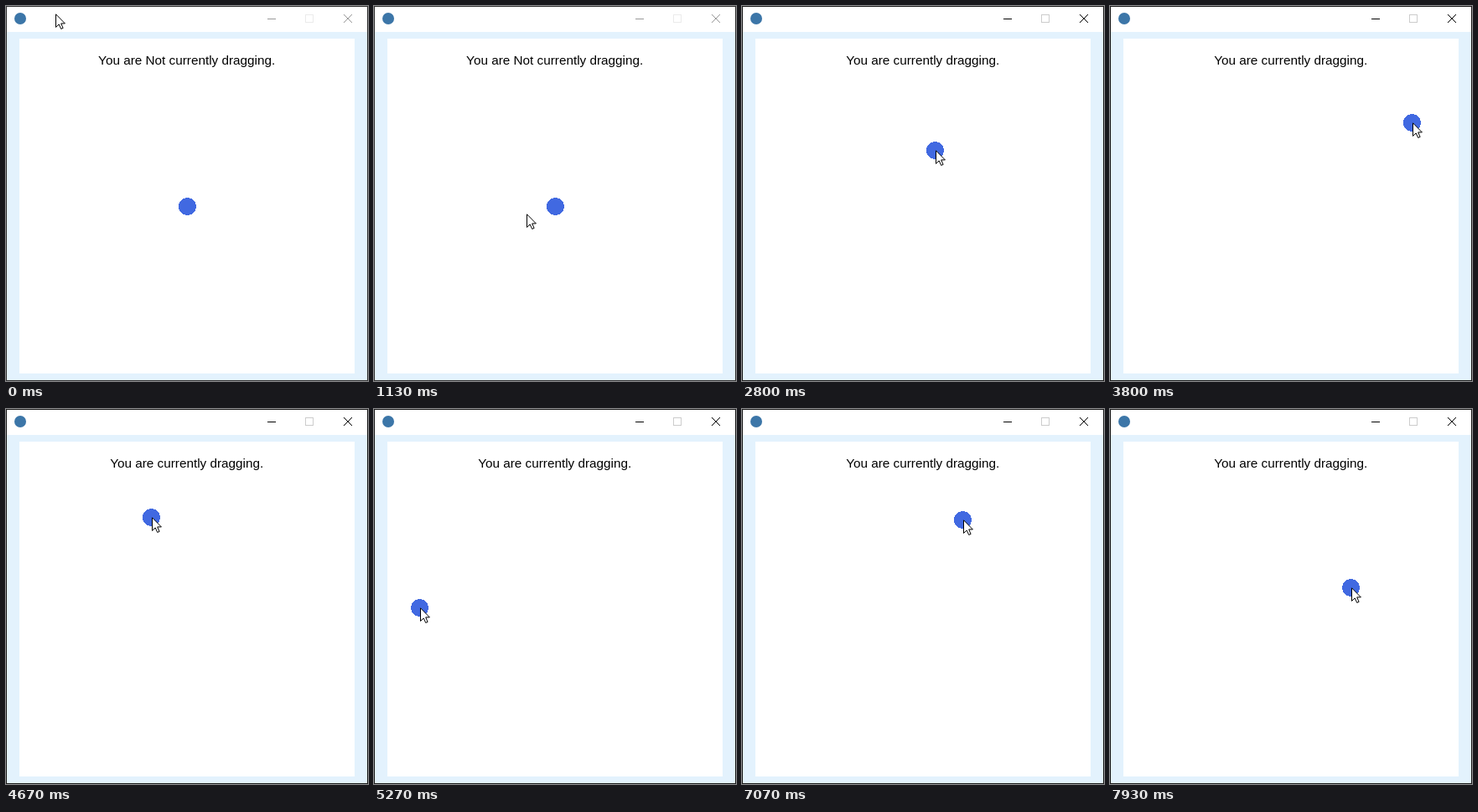
These frames come from a looping animation (432x448 px, 8 s). An HTML page:

```html
<!DOCTYPE html>
<html lang="en">
<head>
<meta charset="utf-8">
<title>Drag demo</title>
<style>
  html, body { margin: 0; width: 100%; height: 100%; overflow: hidden; background: #fff; }
  svg { display: block; }
  .frame { stroke: #1c1c1c; fill: none; }
  .buttons { stroke: #000; fill: none; }
  .buttons rect { stroke: #ccc; }
  .inactive .frame { stroke: #333; }
  .inactive .buttons { stroke: #999; }
  .inactive .buttons rect { stroke: #ebebeb; }
  text { font: 15.3px Arial, "Liberation Sans", sans-serif; text-anchor: middle; }
  #ball { shape-rendering: crispEdges; }
</style>
</head>
<body>
<svg id="win" width="432" height="448" viewBox="0 0 432 448">
  <rect width="432" height="448" fill="#fff"/>
  <rect y="31" width="432" height="417" fill="#e3f2fd"/>
  <rect x="16" y="39" width="400" height="400" fill="#fff"/>
  <rect class="frame" x=".5" y=".5" width="431" height="447"/>
  <circle cx="17" cy="15" r="7" fill="#3c76a8"/>
  <g class="buttons">
    <path d="M312 15.5h10M403 10l10 10M413 10l-10 10"/>
    <rect x="357.5" y="10.5" width="9" height="9"/>
  </g>
  <text id="label" x="215.7" y="70"></text>
  <circle id="ball" r="10.5" fill="#4169e1"/>
  <path id="arrow" d="M.5 .8V16.4L4.2 12.9L6.7 18.4L9.1 17.4L6.7 11.9H11.4Z" fill="#fff" stroke="#000"/>
</svg>
<script>
const LOOP = 8000, STEP = 200 / 3;
const PRESS = 28, RELEASE = 98, PRESS_AGAIN = 106;

// Rests and turning points of the pointer: [step, x, y]
const path = [
  [3, 59, 9], [17, 182, 248], [24, 221, 242], [27, 221, 242],
  [42, 230, 172], [53, 361, 140], [56, 361, 140],
  [67, 270, 105], [70, 173, 129], [73, 100, 175], [81, 50, 255], [87, 184, 306],
  [95, 263, 132], [106, 263, 132], [113, 228, 195], [118, 268, 235], [120, 300, 191]
];

const rate = (i, axis) => {
  const a = path[i], b = path[i + 1];
  return a && b ? (b[axis] - a[axis]) / (b[0] - a[0]) : 0;
};

// Harmonic mean keeps the curve from overshooting its points
const tangent = (i, axis) => {
  const p = rate(i - 1, axis), q = rate(i, axis);
  return p * q > 0 ? 2 * p * q / (p + q) : 0;
};

function along(step, axis) {
  let i = 0;
  while (path[i + 1][0] <= step) i++;
  const a = path[i], b = path[i + 1], h = b[0] - a[0];
  const u = Math.max(0, (step - a[0]) / h), v = 1 - u;
  return Math.round(v * v * (1 + 2 * u) * a[axis] + u * u * (3 - 2 * u) * b[axis]
    + h * u * v * (v * tangent(i, axis) - u * tangent(i + 1, axis)));
}

const place = (el, x, y) => el.setAttribute("transform", `translate(${x} ${y})`);

function draw(now) {
  const step = Math.floor((now % LOOP + 4) / STEP) % 120;
  const x = along(step, 1), y = along(step, 2);
  const active = step >= PRESS;
  const dragging = active && (step < RELEASE || step >= PRESS_AGAIN);
  win.classList.toggle("inactive", !active);
  label.textContent = `You are ${dragging ? "" : "Not "}currently dragging.`;
  place(arrow, active ? x + 1 : x, y);
  place(ball, active ? x + 0.5 : 216.5, active ? y + 0.5 : 239.5);
}

const [win, label, ball, arrow] = ["win", "label", "ball", "arrow"].map(id => document.getElementById(id));
const start = performance.now();
(function tick() {
  draw(performance.now() - start);
  requestAnimationFrame(tick);
})();
</script>
</body>
</html>
```
